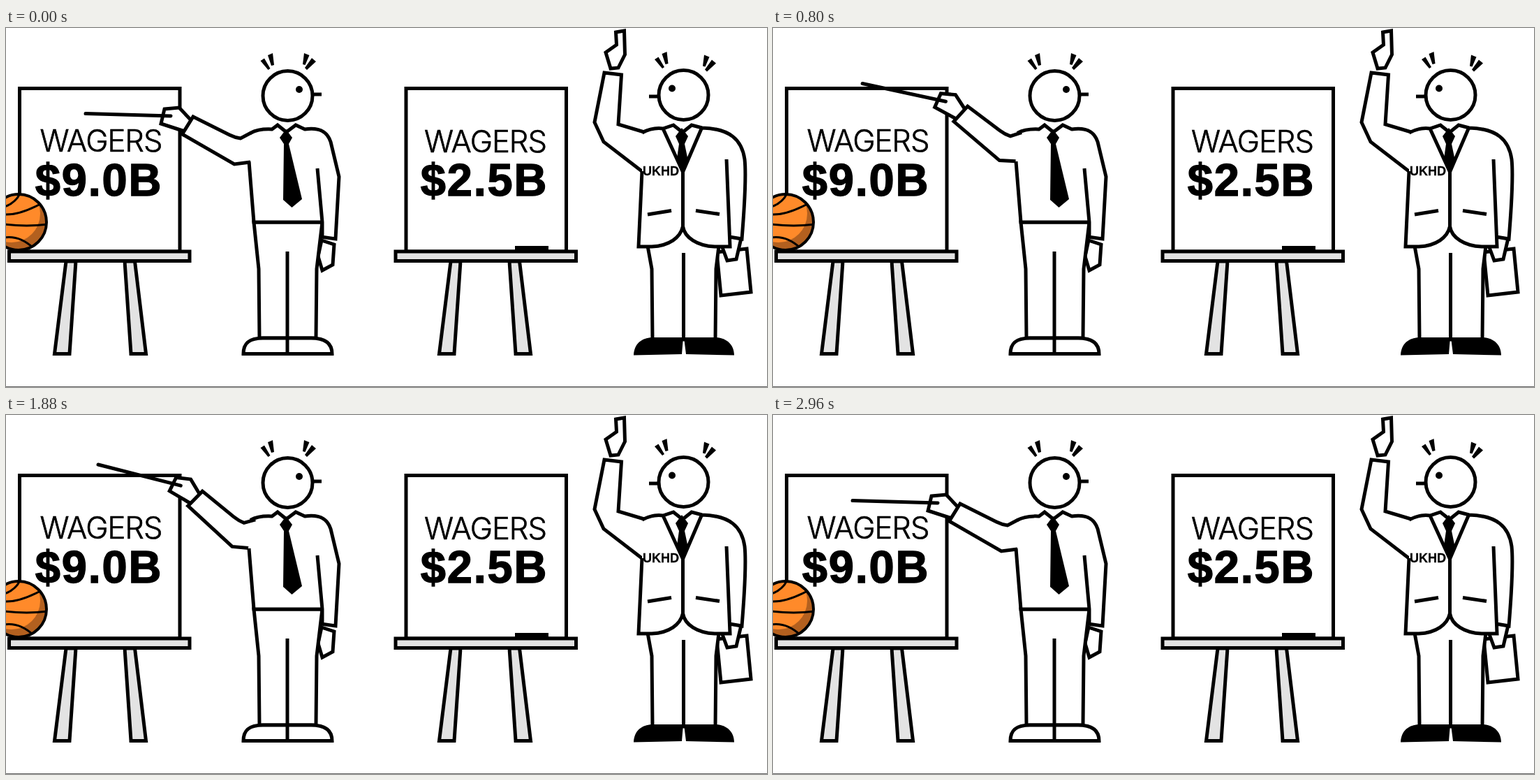
These frames come from a looping animation (1090x514 px, 3 s). An HTML page:

```html
<!DOCTYPE html>
<html lang="en">
<head>
<meta charset="utf-8">
<title>Wagers</title>
<style>
  html, body { margin: 0; width: 100%; height: 100%; overflow: hidden; background: #fff; }
  svg { display: block; width: 1090px; height: 514px; fill: #fff; stroke: #000; stroke-width: 5; }
  text { fill: #000; text-anchor: middle; font-family: "Liberation Sans", Arial, sans-serif; font-weight: 700; }
  .title { font: 300 43.5px Inter, sans-serif; letter-spacing: -1px; stroke-width: .6; }
  .sum { font-size: 65px; letter-spacing: 1.8px; stroke-width: 1.4; }
  .badge { font-size: 18px; stroke-width: .3; }
  .wood { fill: #e3e3e3; }
  .ink { fill: #000; stroke: none; }
  .line { fill: none; }
  .bare { stroke: none; }
</style>
</head>
<body>
<svg viewBox="0 0 1090 514">
  <defs>
    <g id="board">
      <path d="M19.5 86.5H249V320H19.5Z"/>
      <path class="wood" d="M4.5 320H263V333.5H4.5Z"/>
    </g>
    <path id="legs" class="wood" d="M86 334H100L91 466.500H69.500ZM170 334H184.500L200.500 466.500H179Z"/>
    <path id="hairLeft" class="ink" d="M364.500 47L370 43.500L378.500 58L375.500 60ZM375 39L382 36L384 53L380 54Z"/>
    <path id="hairRight" class="ink" d="M427 36L434.500 39L428.500 53L425 52ZM438 43L444 48L431 60L428 57Z"/>
    <clipPath id="ballEdge"><circle cx="18" cy="278" r="40"/></clipPath>
  </defs>

  <path d="M0 513.500H1090" stroke="#666" stroke-width="1"/>

  <!-- boards -->
  <use href="#legs"/>
  <use href="#legs" x="551"/>
  <use href="#board"/>
  <use href="#board" x="553.5"/>
  <path class="ink" d="M729 312H777V319H729Z"/>
  <text class="title" x="136" y="176.500">WAGERS</text>
  <text class="sum" x="133" y="240">$9.0B</text>
  <text class="title" x="686.500" y="177.500">WAGERS</text>
  <text class="sum" x="685" y="240">$2.5B</text>

  <!-- basketball -->
  <g clip-path="url(#ballEdge)">
    <circle class="bare" cx="18" cy="278" r="40" style="fill:#b3601f"/>
    <circle class="bare" cx="8" cy="266" r="41" style="fill:#ff8a2a"/>
    <path class="line" stroke-width="3" d="M20 237Q14 250 -2 256M-2 267Q20 268 51 251M-2 281Q30 285 60 281M-2 300Q20 297 39 315"/>
  </g>
  <circle class="line" cx="18" cy="278" r="40" stroke-width="4"/>

  <!-- man with the pointer -->
  <use href="#hairLeft"/>
  <use href="#hairRight"/>
  <path d="M439 95H452"/>
  <circle cx="403.500" cy="97" r="35.500"/>
  <circle class="ink" cx="420" cy="88" r="5"/>
  <path d="M452 304L470 310L468 339L453 347L447 327Z"/>
  <path d="M355 278L362 345L363 444H444L445 345L453 278Z"/>
  <path d="M340 466.500C340 450 350 444 368 444H437C458 444 467 452 467 466.500Z"/>
  <path d="M403 320V466"/>
  <path class="bare" d="M350 150L380 145L389 139L415 139L428 145C449 142 460 148 465 163L477 213L472 302L453 299V278H355L348 192Z"/>
  <g id="pointerArm">
    <path d="M227 116L248 114L266 133L256 148L222 137Z"/>
    <path d="M114 122.500L236 126" stroke-linecap="round"/>
    <path d="M351 150L336 158Q328 157 320 153L268 127L252.500 152L327 195L350 192"/>
  </g>
  <path class="line" d="M350 150.500Q362 144 381 145L389 139L401.500 149L415 139L428 145C449 142 460 148 465 163L477 213L472 302L451 299M446 201L453 278V299M348 191L355 278H454"/>
  <path class="ink" d="M401 145L410 157L405 166L424 245L409.500 257L397 246L398 166L392 157Z"/>

  <!-- man in the jacket -->
  <use href="#hairLeft" x="564.5" y="-2"/>
  <use href="#hairRight" x="573" y="2.5"/>
  <path d="M921 98H936"/>
  <circle cx="970.500" cy="96" r="35.500"/>
  <circle class="ink" cx="954" cy="86.500" r="5"/>
  <path d="M1018 321L1024 383L1067 378L1061 316Z"/>
  <path d="M1026 314L1033 333L1046 331L1053 301L1032 298Z"/>
  <path d="M919 312L925 345L926 446H1016L1017 345L1021 312"/>
  <path d="M970.500 322V446"/>
  <path class="ink" d="M899 468.500C900 451 911 444 925 443H970L968 467ZM971 443H1017C1033 444 1043 454 1043 468.500L974 467Z"/>
  <g id="armUp">
    <path d="M873.500 6L885.500 4L886.500 38L877 57L866 58L859 35L874.500 24Z"/>
    <path d="M914 149L877 138L881.500 67L857 64L843 135L856 163L912 206"/>
  </g>
  <g id="armOut">
    <path d="M723 148L762 145L779 154V166L766 171.500L752 168L742 157L727 156.500Z"/>
    <path class="line" d="M730 158L746 155" stroke-width="4"/>
    <path d="M914 149L906 150L787 148L785 174L867 186L912 206"/>
  </g>
  <path class="bare" d="M911 149L932 142L956 139L983 139L998 143C1040 144 1058 165 1059 205L1054 301L1037 298V313H1015C990 312 972 300 969.500 284C966 300 950 312 925 313H906L911 205Z"/>
  <path class="line" d="M911 150Q926 142 941 144L956 139L969 149.500L982 139L997 143C1037 144 1054 160 1058 188Q1061 216 1054 302L1036 299M1032 188L1037 313H1015C990 312 972 300 969.500 284C966 300 950 312 925 313H906L911 205M941 144L969.500 206L997 142M969.500 204V284M919 267L953 261.500M988 261.500L1022 266.500"/>
  <path class="ink" d="M968 143L977 155L972 166L977 190L969.500 208L961 187L964 166L959 155Z"/>
  <text class="badge" x="938" y="211">UKHD</text>
</svg>
<script>
  const LOOP = 3000, STEP = 40, HALF = 1480;
  const [pointerArm, armUp, armOut] = ["pointerArm", "armUp", "armOut"].map(id => document.getElementById(id));

  // 0 = lowered, 1 = raised: quick rise, then a slow start downwards
  function lift(t) {
    const u = t / HALF;
    return u < 1 ? 1 - (1 - u ** 1.6) ** 3 : Math.cos((u - 1) * Math.PI / 2);
  }

  function draw(now) {
    const t = Math.floor(now % LOOP / STEP) * STEP;
    pointerArm.setAttribute("transform", `rotate(${13.9 * lift(t)} 355 178)`);
    const beat = t % 1000, out = beat >= 250 && beat < 750;
    armUp.style.display = out ? "none" : "";
    armOut.style.display = out ? "" : "none";
  }

  const start = performance.now();
  function tick() {
    draw(performance.now() - start);
    requestAnimationFrame(tick);
  }
  tick();
</script>
</body>
</html>
```
